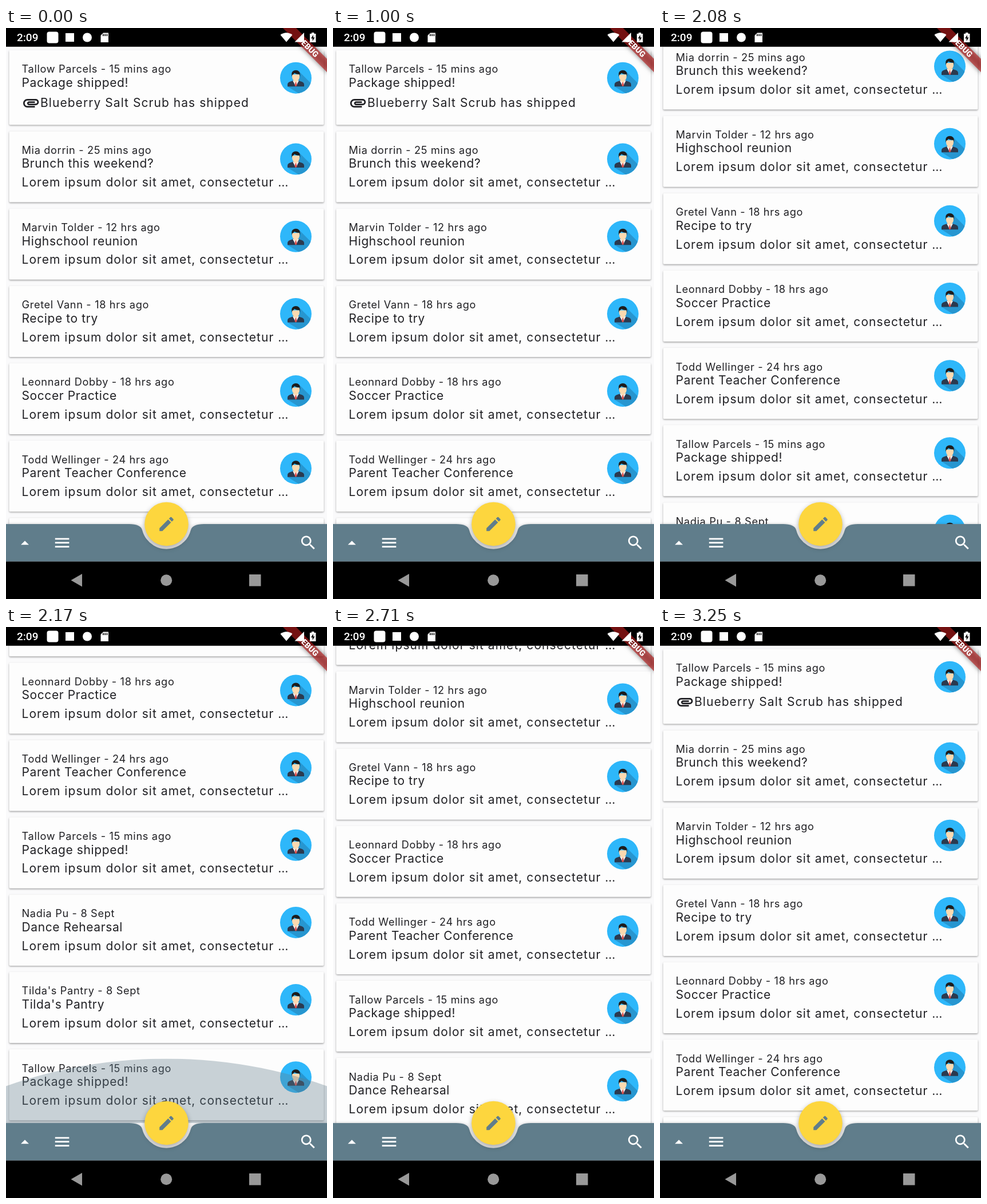
Recreate the animation shown at these times as an HTML page with a canvas. Size 561 by 998 pixels, loop 3740 ms.

```html
<!DOCTYPE html>
<html lang="en">
<head>
<meta charset="utf-8">
<title>Inbox</title>
<style>
  html, body { margin: 0; width: 100%; height: 100%; overflow: hidden; background: #000; }
  canvas { display: block; }
</style>
</head>
<body>
<canvas id="stage" width="561" height="998"></canvas>
<script>
const ctx = document.getElementById('stage').getContext('2d');
const W = 561, H = 998, DP = W / 411;
const LOOP = 3740, STEP = 1000 / 24;
const TOP = 24 * DP, NAV = H - 48 * DP, BOTTOM = NAV - 48 * DP, MAX_SCROLL = 523.6;
const INK = '#202024', SLATE = '#607d8b', PAPER = '#fafafb';

const LOREM = 'Lorem ipsum dolor sit amet, consectetur …';
const parcel = ['Tallow Parcels - 15 mins ago', 'Package shipped!'];
const mails = [
  parcel,
  ['Mia dorrin - 25 mins ago', 'Brunch this weekend?'],
  ['Marvin Tolder - 12 hrs ago', 'Highschool reunion'],
  ['Gretel Vann - 18 hrs ago', 'Recipe to try'],
  ['Leonnard Dobby - 18 hrs ago', 'Soccer Practice'],
  ['Todd Wellinger - 24 hrs ago', 'Parent Teacher Conference'],
  parcel,
  ['Nadia Pu - 8 Sept', 'Dance Rehearsal'],
  ["Tilda's Pantry - 8 Sept", "Tilda's Pantry"],
  parcel
];

const ICONS = {
  menu: new Path2D('M3 6h18v2H3zM3 11h18v2H3zM3 16h18v2H3z'),
  clip: new Path2D('M2 12.5C2 9.46 4.46 7 7.5 7H18c2.21 0 4 1.79 4 4s-1.79 4-4 4H9.5C8.12 15 7 13.88 7 12.5S8.12 10 9.5 10H17v2H9.41c-.55 0-.55 1 0 1H18c1.1 0 2-.9 2-2s-.9-2-2-2H7.5C5.57 9 4 10.57 4 12.5S5.57 16 7.5 16H17v2H7.5C4.46 18 2 15.54 2 12.5z'),
  pencil: new Path2D('M3 17.25V21h3.75L17.81 9.94l-3.75-3.75L3 17.25zM20.71 7.04c.39-.39.39-1.02 0-1.41l-2.34-2.34c-.39-.39-1.02-.39-1.41 0l-1.83 1.83 3.75 3.75 1.83-1.83z'),
  search: new Path2D('M15.5 14h-.79l-.28-.27C15.41 12.59 16 11.11 16 9.5 16 5.91 13.09 3 9.5 3S3 5.91 3 9.5 5.91 16 9.5 16c1.61 0 3.09-.59 4.23-1.57l.27.28v.79l5 4.99L20.49 19l-4.99-5zm-6 0C7.01 14 5 11.99 5 9.5S7.01 5 9.5 5 14 7.01 14 9.5 11.99 14 9.5 14z')
};
const SUIT = new Path2D('M-14.5 15V11Q-14 7.5-10 6.5L-4 4.5H4L10 6.5Q14 7.5 14.5 11V15Z');
const SHIRT = new Path2D('M-5.5 4.5L0 15L5.5 4.5Z');
const TIE = new Path2D('M-1.4 6.5H1.4L1 8.5L2 13L0 15L-2 13L-1 8.5Z');
const FACE = new Path2D('M-6.5-6H6.5V-2Q6 3 3 5V6L0 8L-3 6V5Q-6 3-6.5-2Z');
const HAIR = new Path2D('M-7.2-2V-8Q-6.5-13 0-13.5Q7-13 7.3-7V-2L6-6.5Q1-6-2.5-8.5Q-4-6-6-5.5Z');
const LONG_SHADOW = new Path2D('M6-11L40 23V49L-14.5 15Z');

const clamp01 = x => Math.min(1, Math.max(0, x));
const decelerate = x => 1 - (1 - x) ** 2;

function fill(path, color) {
  ctx.fillStyle = color;
  ctx.fill(path);
}

function rect(x, y, w, h, color) {
  ctx.fillStyle = color;
  ctx.fillRect(x, y, w, h);
}

function disc(x, y, r, color) {
  ctx.fillStyle = color;
  ctx.beginPath();
  ctx.arc(x, y, r, 0, Math.PI * 2);
  ctx.fill();
}

function poly(color, ...points) {
  ctx.fillStyle = color;
  ctx.beginPath();
  points.forEach(([x, y]) => ctx.lineTo(x, y));
  ctx.fill();
}

function icon(name, x, y, color) {
  ctx.save();
  ctx.translate(x, y);
  ctx.scale(DP, DP);
  fill(ICONS[name], color);
  ctx.restore();
}

function label(text, x, y, size, spacing) {
  ctx.font = `${size}px Inter, sans-serif`;
  ctx.letterSpacing = spacing + 'px';
  ctx.fillStyle = INK;
  ctx.fillText(text, x, y);
}

function shadow(color, blur, dy) {
  ctx.shadowColor = color;
  ctx.shadowBlur = blur;
  ctx.shadowOffsetY = dy;
}

function scrollAt(t) {
  if (t < 2640) return MAX_SCROLL * clamp01((t - 2060) / 62) ** 1.2;
  return MAX_SCROLL * (1 - clamp01((t - 2655) / 90) ** 1.16);
}

function glowAt(t, hit, peak) {
  if (t < hit) return 0;
  if (t < peak) return decelerate((t - hit) / (peak - hit));
  return 1 - decelerate(clamp01((t - peak) / 600));
}

function avatar(x, y) {
  ctx.save();
  ctx.translate(x, y);
  disc(0, 0, 27.5, '#2eb7fa');
  ctx.clip();
  fill(LONG_SHADOW, '#2796d0');
  fill(SUIT, '#2b3a4f');
  fill(SHIRT, '#f4f4f4');
  fill(TIE, '#e0524d');
  fill(FACE, '#fbd9b0');
  fill(HAIR, '#1d1c1c');
  ctx.restore();
}

function card(mail, i, scroll) {
  const y = (i ? 180.4 + 135.15 * (i - 1) : 38.5) - scroll;
  if (y > BOTTOM || y < -140) return;
  ctx.save();
  shadow('rgba(0,0,0,.36)', 3, 1.4);
  ctx.fillStyle = '#fdfdfd';
  ctx.beginPath();
  ctx.roundRect(5.5, y, 550, i ? 124.2 : 130.7, 2);
  ctx.fill();
  ctx.restore();
  label(mail[0], 27.5, y + 39.6, 18.2, .65);
  label(mail[1], 27.5, y + 64, 21, .6);
  if (i) {
    label(LOREM, 27.5, y + 96.9, 21, 1.05);
  } else {
    icon('clip', 27.3, y + 76, INK);
    label('Blueberry Salt Scrub has shipped', 60, y + 99.8, 21, 1.05);
  }
  avatar(506.5, y + 48.7);
}

// Overscroll glow: a wide circle squashed against the edge it hit.
function glow(amount, edge, direction) {
  if (amount <= 0) return;
  const radius = W * 1.5, depth = W * .201;
  ctx.save();
  ctx.translate(W / 2, edge);
  ctx.scale(1, direction * amount);
  ctx.beginPath();
  ctx.rect(-W / 2, 0, W, depth);
  ctx.clip();
  ctx.globalAlpha = .34 * amount;
  disc(0, depth - radius, radius, SLATE);
  ctx.restore();
}

function bottomBar() {
  const cx = W / 2, r = 43.7, a = r + DP, px = r * r / a, py = Math.sqrt(r * r - px * px);
  const angle = Math.atan2(py, px), lead = a + 15 * DP;
  rect(0, BOTTOM, W, NAV - BOTTOM, PAPER);
  ctx.save();
  shadow('rgba(0,0,0,.2)', 5, 0);
  ctx.fillStyle = SLATE;
  ctx.beginPath();
  ctx.moveTo(0, BOTTOM);
  ctx.lineTo(cx - lead, BOTTOM);
  ctx.quadraticCurveTo(cx - a, BOTTOM, cx - px, BOTTOM + py);
  ctx.arc(cx, BOTTOM, r, Math.PI - angle, angle, true);
  ctx.quadraticCurveTo(cx + a, BOTTOM, cx + lead, BOTTOM);
  ctx.lineTo(W, BOTTOM);
  ctx.lineTo(W, NAV);
  ctx.lineTo(0, NAV);
  ctx.fill();
  ctx.restore();

  ctx.save();
  shadow('rgba(0,0,0,.34)', 8, 3.5);
  disc(cx, BOTTOM, 38.3, '#fdd63e');
  ctx.restore();
  icon('pencil', cx - 12 * DP, BOTTOM - 12 * DP, SLATE);

  const iconTop = (BOTTOM + NAV) / 2 - 12 * DP;
  poly('#fff', [26, 903.2], [40, 903.2], [33, 896.2]);
  icon('menu', 81.7, iconTop, '#fff');
  icon('search', 511.8, iconTop, '#fff');
}

function navBar() {
  const cy = (NAV + H) / 2;
  rect(0, NAV, W, H - NAV, '#000');
  poly('#999', [113.5, cy], [133, cy - 11.3], [133, cy + 11.3]);
  disc(W / 2 - .3, cy, 10, '#999');
  rect(425, cy - 10.2, 20.5, 20.5, '#999');
}

function debugBanner() {
  ctx.save();
  ctx.translate(W, 0);
  ctx.rotate(Math.PI / 4);
  ctx.save();
  shadow('rgba(0,0,0,.8)', 8, 0);
  rect(-40 * DP, 28 * DP, 80 * DP, 12 * DP, 'rgba(183,28,28,.627)');
  ctx.restore();
  ctx.font = '900 13.9px Roboto, sans-serif';
  ctx.letterSpacing = '0px';
  ctx.textAlign = 'center';
  ctx.fillStyle = '#fff';
  ctx.fillText('DEBUG', 0, 34 * DP + 5);
  ctx.restore();
}

function statusIcons() {
  ctx.font = '500 19px Roboto, sans-serif';
  ctx.letterSpacing = '0px';
  ctx.fillStyle = '#fff';
  ctx.fillText('2:09', 19, 23.3);
  ctx.beginPath();
  ctx.roundRect(71.5, 6.5, 20, 20, 4);
  ctx.fill();
  rect(104, 9, 15, 15, '#fff');
  disc(142, 16.5, 8, '#fff');

  poly('#fff', [165.5, 13], [170, 8.5], [179, 8.5], [179, 25], [165.5, 25]);
  for (const x of [169, 172.3, 175.6]) rect(x, 10.5, 1.7, 3.6, '#000');

  ctx.fillStyle = '#fff';
  ctx.beginPath();
  ctx.moveTo(490, 24.5);
  ctx.lineTo(479.5, 12);
  ctx.quadraticCurveTo(490, 4.5, 500.5, 12);
  ctx.fill();
  poly('#fff', [504.5, 24.5], [521, 24.5], [521, 8]);
  rect(531, 10, 10.5, 15, '#fff');
  rect(534, 8, 4.5, 2, '#fff');
  poly('#000', [537, 12], [533, 18.3], [535.7, 18.3], [535.7, 23], [539.6, 16.6], [537, 16.6]);
}

function draw(t) {
  rect(0, 0, W, H, PAPER);
  ctx.save();
  ctx.beginPath();
  ctx.rect(0, TOP, W, BOTTOM - TOP);
  ctx.clip();
  const scroll = scrollAt(t);
  mails.forEach((mail, i) => card(mail, i, scroll));
  glow(glowAt(t, 2115, 2166), BOTTOM, -1);
  glow(glowAt(t, 2743, 2790), TOP, 1);
  ctx.restore();
  bottomBar();
  rect(0, 0, W, TOP, '#000');
  debugBanner();
  statusIcons();
  navBar();
}

// The screen refreshes 24 times a second.
function tick() {
  const t = performance.now() % LOOP;
  draw(Math.floor(t / STEP + .25) * STEP);
  requestAnimationFrame(tick);
}
tick();
</script>
</body>
</html>
```
